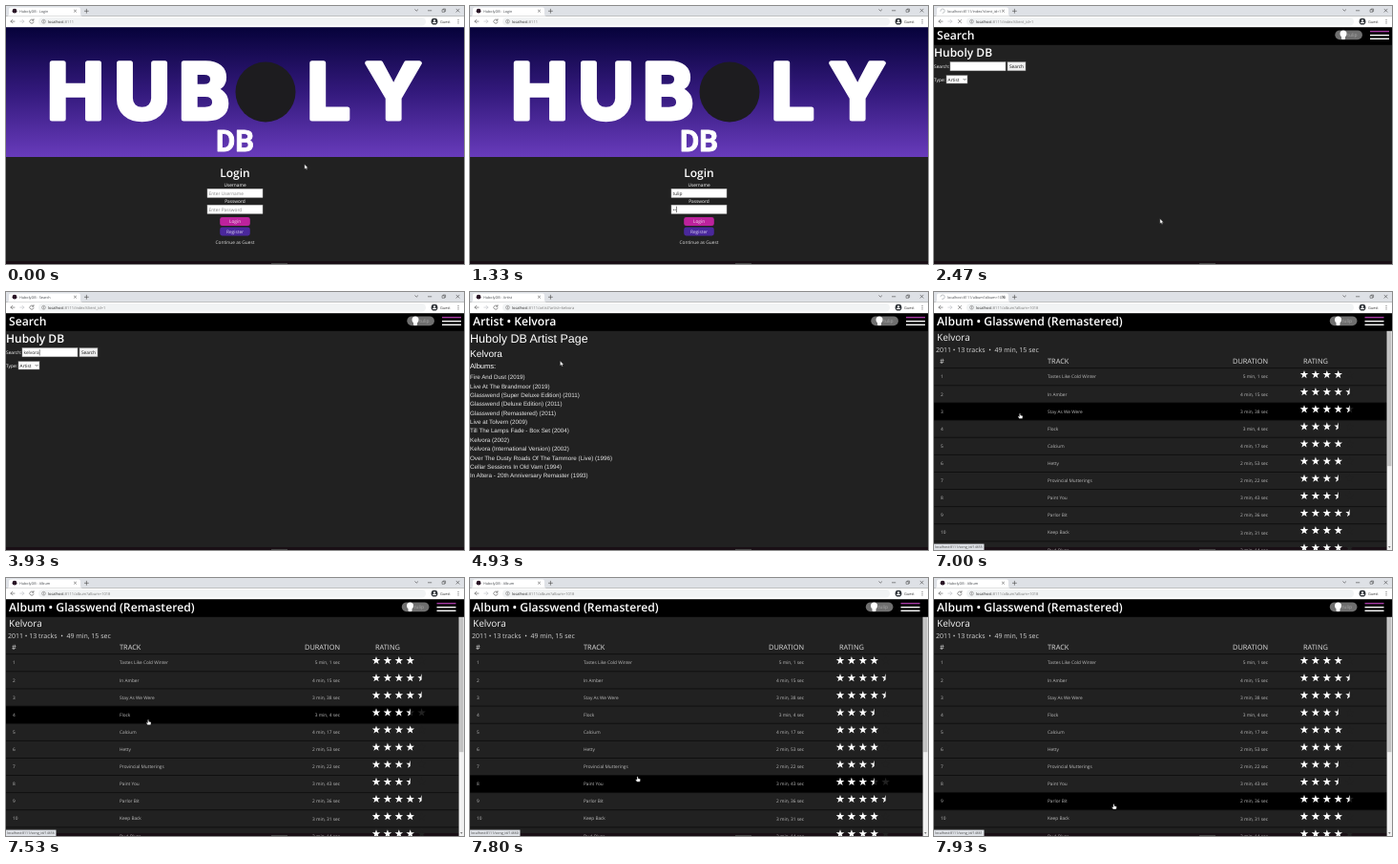
An HTML page that plays this animation: 480x270 px, repeating every 8000 ms.

```html
<!DOCTYPE html>
<html lang="en">
<head>
<meta charset="utf-8">
<title>HubolyDB</title>
<style>
html, body { margin: 0; width: 100%; height: 100%; overflow: hidden; background: #212121; }
svg { display: block; width: 100vw; height: 100vh; text-rendering: geometricPrecision; }
text { font-family: "Open Sans", "Noto Sans", sans-serif; white-space: pre; }
.arial { font-family: "Liberation Sans", Arial, sans-serif; }
.logo { font-family: Inter, Roboto, sans-serif; font-weight: 700; stroke: #fff; stroke-linejoin: round; }
.line { fill: none; stroke-linecap: round; stroke-linejoin: round; }
</style>
</head>
<body>
<svg id="stage" viewBox="0 0 480 270" xmlns="http://www.w3.org/2000/svg"></svg>
<script>
const LOOP = 8000, ROW_TOP = 79.7, ROW_H = 18.12;
const BAND = 'Kelvora', APP = 'Huboly', USER = 'tulip', HOST = 'localhost:8111';

// y is the middle of the capitals
const text = (x, y, s, size, fill = '#fff', attrs = '') =>
  `<text x="${x}" y="${(y + size * 0.36).toFixed(2)}" font-size="${size}" fill="${fill}" ${attrs}>${s}</text>`;
const rect = (x, y, w, h, fill, attrs = '') =>
  `<rect x="${x}" y="${y}" width="${w}" height="${h}" fill="${fill}" ${attrs}/>`;
const line = (d, stroke, width, attrs = '') =>
  `<path class="line" d="${d}" stroke="${stroke}" stroke-width="${width}" ${attrs}/>`;
const circle = (x, y, r, fill, attrs = '') =>
  `<circle cx="${x}" cy="${y}" r="${r}" fill="${fill}" ${attrs}/>`;
const group = (id, body) => `<g id="${id}">${body}</g>`;
const MID = 'text-anchor="middle"', END = 'text-anchor="end"', BOLD = 'font-weight="600"';

const field = (id, x, y, w, hint) =>
  rect(x, y, w, 9.2, '#fff', 'stroke="#b0b0b0" stroke-width=".5"') +
  (hint ? text(x + 1.5, y + 4.8, hint, 4.8, '#858585', `id="${id}Hint"`) : '') +
  text(x + 1.5, y + 4.8, '', 4.8, '#222', `id="${id}"`) +
  rect(0, y + 1.5, 0.5, 6.4, '#111', `id="${id}Caret"`);

const button = (y, s, fill, ink) =>
  rect(224.2, y, 31.6, 9, fill, 'rx="2.4"') + text(240, y + 4.4, s, 4.8, ink, MID);

function browser() {
  return rect(0, 0, 480, 10.6, '#dee1e6') +
    '<path d="M1 10.6Q3 10.6 3 8.5V3.6Q3 1.4 5 1.4H76Q78 1.4 78 3.6V8.5Q78 10.6 80 10.6Z" fill="#fff"/>' +
    circle(9, 5.2, 2.4, '#2a1626', 'id="icon"') +
    line('M9 3a2.2 2.2 0 1 1-2.2 2.2', '#9aa0a6', 0.6, 'id="spinner"') +
    text(14, 5.3, '', 3.75, '#45494d', 'id="tab"') +
    line('M71.4 4.1l2.2 2.2m0-2.2l-2.2 2.2', '#444', 0.55) +
    line('M82.4 5.3h4m-2-2v4', '#444', 0.6) +
    line('M428.7 3.8l1.5 1.4 1.5-1.4M442.4 4.8h3.4M472 3.2l3 3m0-3l-3 3', '#333', 0.55) +
    line('M457.4 3.8h2.4v2.5h-2.4zM458.2 3.7v-.7h2.4v2.5h-.7', '#333', 0.45) +
    rect(0, 10.6, 480, 11.6, '#fff') +
    line('M9 16.1H5m1.8-1.8L5 16.1l1.8 1.8', '#555', 0.6) +
    line('M14.8 16.1h4m-1.8-1.8l1.8 1.8-1.8 1.8', '#b8bbbf', 0.6) +
    line('M28.6 14.8a2.1 2.1 0 1 0 .4 1.9M29 13.6v1.5h-1.5', '#555', 0.6, 'id="reload"') +
    line('M25.4 14.5l3.2 3.2m0-3.2l-3.2 3.2', '#555', 0.6, 'id="stop"') +
    rect(34, 12, 406, 8.6, '#f1f3f4', 'rx="4.3"') +
    circle(39.5, 16.2, 1.9, 'none', 'stroke="#666" stroke-width=".5"') +
    line('M39.5 16.1v1M39.5 15.2v.05', '#666', 0.5) +
    `<text x="44" y="17.6" font-size="4" fill="#777"><tspan fill="#222">localhost</tspan><tspan id="path"></tspan></text>` +
    circle(449, 16.2, 3.4, '#32363b') + circle(449, 15.3, 1.1, '#fff') +
    '<path d="M446.9 18a2.1 1.5 0 0 1 4.2 0z" fill="#fff"/>' +
    text(455, 16.2, 'Guest', 3.9, '#333') +
    [14.4, 16.2, 18].map(y => circle(474, y, 0.5, '#444')).join('');
}

function login() {
  const letters = [['H', 73], ['U', 142.5], ['B', 207.5], ['L', 338], ['Y', 406]];
  return rect(0, 22, 480, 136, 'url(#sky)') +
    letters.map(([c, x]) => text(x, 89.6, c, 80, '#fff', `class="logo" stroke-width="5" ${MID}`)).join('') +
    circle(272, 90, 31.5, '#1d1c1f') +
    text(240, 141, 'DB', 31, '#fff', `class="logo" stroke-width=".8" ${MID} style="font-family:Roboto,sans-serif"`) +
    text(240, 174.3, 'Login', 12, '#fff', MID + ' ' + BOLD) +
    text(240, 187.4, 'Username', 4.8, '#fff', MID) +
    field('user', 211, 191.3, 58, 'Enter Username') +
    text(240, 204.6, 'Password', 4.8, '#fff', MID) +
    field('pass', 211, 208.2, 58, 'Enter Password') +
    button(221.1, 'Login', '#bd229d', '#f3dff0') +
    button(231.5, 'Register', '#4a289c', '#d9d0f0') +
    text(240, 247.2, 'Continue as Guest', 4.8, '#ddd', MID);
}

function search() {
  return text(0, 48.8, APP + ' DB', 12, '#fff', BOLD) +
    text(0, 63.4, 'Search:', 4.8) + field('query', 17, 58.6, 58) +
    rect(77, 58.6, 19, 9.2, '#efefef', 'stroke="#8a8a8a" stroke-width=".5"') +
    text(86.5, 63.4, 'Search', 4.8, '#111', MID) +
    text(0, 77, 'Type:', 4.8) +
    rect(13, 72.7, 22, 8.3, '#fff', 'stroke="#8a8a8a" stroke-width=".5"') +
    text(14.6, 76.9, 'Artist', 4.8, '#111') +
    line('M30.9 76.3l1.2 1.2 1.2-1.2', '#222', 0.6);
}

function artist() {
  const best = 'Glasswend';
  const albums = [
    'Fire And Dust (2019)', 'Live At The Brandmoor (2019)',
    best + ' (Super Deluxe Edition) (2011)', best + ' (Deluxe Edition) (2011)', best + ' (Remastered) (2011)',
    'Live at Tolvern (2009)', 'Till The Lamps Fade - Box Set (2004)',
    BAND + ' (2002)', BAND + ' (International Version) (2002)',
    'Over The Dusty Roads Of The Tammore (Live) (1996)',
    'Cellar Sessions In Old Varn (1994)', 'In Altera - 20th Anniversary Remaster (1993)'];
  const say = (y, s, size, fill) => text(0, y, s, size, fill, 'class="arial"');
  return say(48.1, APP + ' DB Artist Page', 12.5) + say(64.4, BAND, 10) + say(77.2, 'Albums:', 7.5) +
    albums.map((s, i) => say(88.9 + i * 9.375, s, 6.25, '#e6e6e6')).join('');
}

function starPart(x, y, from, to, fill) {
  const pts = [];
  for (let k = from; k <= to; k++) {
    const a = (k * 36 - 90) * Math.PI / 180, r = k % 2 ? 1.8 : 4.5;
    pts.push((x + r * Math.cos(a)).toFixed(2) + ',' + (y + r * Math.sin(a)).toFixed(2));
  }
  return `<polygon points="${pts.join(' ')}" fill="${fill}"/>`;
}

function stars(y, rating) {
  let out = '';
  for (let i = 0; i < 5; i++) {
    const x = 388 + i * 11.9, left = rating - i;
    out += starPart(x, y, 0, 9, '#212121');
    if (left > 0) out += starPart(x, y, left < 1 ? 5 : 0, 10, '#fff');
  }
  return out;
}

function album() {
  const tracks = [
    ['Tastes Like Cold Winter', '5 min, 1', 4], ['In Amber', '4 min, 15', 4.5],
    ['Stay As We Were', '3 min, 38', 4.5], ['Flock', '3 min, 4', 3.5],
    ['Calcium', '4 min, 17', 4], ['Hetty', '2 min, 53', 4],
    ['Provincial Mutterings', '2 min, 22', 3.5], ['Paint You', '3 min, 43', 3.5],
    ['Parlor Bit', '2 min, 36', 4.5], ['Keep Back', '3 min, 31', 4], ['By A River', '2 min, 14', 4]];
  const grey = '#bdbdbd';
  return text(3, 47.8, BAND, 10, '#f2f2f2') +
    text(2, 60.6, '2011 • 13 tracks \u00a0•\u00a0 49 min, 15 sec', 7, '#d5d5d5') +
    text(6, 72, '#', 7.3, '#ddd') + text(119, 72, 'TRACK', 7.4, '#ddd') +
    text(350, 72, 'DURATION', 7.4, '#ddd', END) + text(387, 72, 'RATING', 7.4, '#ddd') +
    rect(0, 0, 474.6, ROW_H, '#000', 'id="hover"') +
    tracks.map(([name, time, rating], i) => {
      const y = ROW_TOP + i * ROW_H;
      return rect(0, y - 0.4, 474.6, 0.8, '#0b0b0b') +
        text(7, y + 9, i + 1, 4.75, grey) + text(119, y + 9, name, 4.75, grey) +
        text(350, y + 9, time + ' sec', 4.8, grey, END) + stars(y + 6.8, rating);
    }).join('') +
    rect(474.6, 22, 5.4, 248, '#f1f1f1') + rect(475.2, 27.2, 4.2, 155, '#c1c1c1') +
    '<path d="M476 25.6l1.3-1.5 1.3 1.5zM476 266.2l1.3 1.5 1.3-1.5z" fill="#555"/>' +
    group('status', rect(0, 263.6, 52.5, 6.4, '#dee1e6') + text(1, 266.9, '', 3.6, '#444', 'id="link"'));
}

function header() {
  return rect(0, 22, 480, 18.8, '#000') +
    text(3, 30.6, '', 12.2, '#fff', BOLD + ' id="heading"') +
    group('chip',
      rect(420.3, 25.4, 28.6, 9.8, '#6f6f6f', 'rx="4.9"') +
      text(433.2, 30.2, USER, 4.9, '#a8a8a8') +
      circle(429, 29, 3.5, '#fff') + rect(427, 30.8, 4, 4.2, '#fff', 'rx="1"') +
      rect(457, 25.9, 20, 1.4, '#a63aa4') + rect(457, 29.9, 20, 1.4, '#fff') + rect(457, 33.6, 20, 1.4, '#fff'));
}

const pointers = {
  arrow: '<path d="M0 0V5.2L1.3 4.1 2.1 5.9 3 5.5 2.2 3.8H3.8Z" fill="#fff" stroke="#111" stroke-width=".35"/>',
  hand: '<path d="M-.6.4Q0-.3.6.4V2L2.6 2.6Q3.1 2.8 3 3.6L2.6 5.6H-.7L-2 3.6Q-2 2.8-1.2 3.1L-.6 3.6Z" fill="#fff" stroke="#111" stroke-width=".35"/>',
  beam: line('M-.8-2.2h1.6M0-2.2v4.6M-.8 2.4h1.6', '#222', 0.4)
};

document.getElementById('stage').innerHTML =
  '<defs><linearGradient id="sky" x1="0" y1="0" x2="0" y2="1"><stop offset="0" stop-color="#06023a"/>' +
  '<stop offset=".5" stop-color="#33197c"/><stop offset="1" stop-color="#683bbb"/></linearGradient></defs>' +
  rect(0, 0, 480, 270, '#212121') +
  rect(0, 267, 480, 3, '#190f15') + rect(278, 269, 17, 1, '#444') +
  group('login', login()) + group('search', search()) + group('artist', artist()) + group('album', album()) +
  group('header', header()) + browser() +
  group('pointer', Object.keys(pointers).map(k => group(k, pointers[k])).join(''));

const el = {};
document.querySelectorAll('[id]').forEach(e => el[e.id] = e);
const show = (id, on) => el[id].style.display = on ? '' : 'none';
const put = (id, s) => { if (el[id].textContent !== s) el[id].textContent = s; };

const heads = { login: '', search: 'Search', artist: 'Artist • ' + BAND, album: 'Album • Glasswend (Remastered)' };
const paths = { login: '', search: '/index?client_id=1', artist: '/artist?artist=' + BAND.toLowerCase(), album: '/album?album=1018' };

// time, page, loading, page title known
const visits = [
  [0, 'login', 0, 1], [2200, 'login', 1, 1], [2330, 'search', 1, 0], [2530, 'search', 0, 1],
  [4200, 'search', 1, 1], [4400, 'artist', 1, 0], [4600, 'artist', 0, 1],
  [6750, 'artist', 1, 1], [6930, 'album', 1, 0], [7130, 'album', 0, 1]];

// time, x, y, pointer from then on
const moves = [
  [0, 312.8, 165.6, 'arrow'], [70, 312.8, 165.6, 'arrow'], [480, 252, 195, 'beam'], [660, 250, 196, ''],
  [1660, 250, 198, 'arrow'], [1990, 238, 222, 'hand'], [2130, 236.8, 222.6, 'hand'], [2330, 236.8, 222.6, 'arrow'],
  [2470, 236.8, 222.6, 'arrow'], [2930, 60, 72, 'arrow'], [3000, 46, 63, 'beam'], [3590, 46, 63, ''],
  [4730, 46, 63, 'arrow'], [5000, 110, 75, 'arrow'], [5270, 203, 96, 'arrow'], [5600, 170, 140, 'arrow'],
  [5870, 138.2, 151.5, 'arrow'], [6130, 137.8, 151.3, 'arrow'], [6395, 137.8, 151.3, 'arrow'],
  [6600, 90, 127, 'hand'], [7200, 90, 127, 'hand'], [7330, 112, 136, 'hand'],
  [7530, 148.6, 147.2, 'hand'], [7930, 188.4, 236.4, 'hand'], [8000, 188.4, 236.4, 'hand']];

const last = (table, t) => table.filter(r => r[0] <= t).pop();

function pointerAt(t) {
  const a = last(moves, t), b = moves[moves.indexOf(a) + 1] || a;
  const k = b === a ? 0 : (t - a[0]) / (b[0] - a[0]);
  return { x: a[1] + (b[1] - a[1]) * k, y: a[2] + (b[2] - a[2]) * k, kind: a[3] };
}

function type(id, word, keys, t, from, to) {
  const s = word.slice(0, keys.filter(k => k <= t).length), caret = t >= from && t < to;
  put(id, s);
  if (el[id + 'Hint']) show(id + 'Hint', !s);
  show(id + 'Caret', caret);
  if (caret) el[id + 'Caret'].setAttribute('x', +el[id].getAttribute('x') + (s ? el[id].getComputedTextLength() : 0) + 0.2);
}

function draw(now) {
  const t = Math.floor((now % LOOP + 4) * 0.015) / 0.015 + 1;
  const [, page, loading, titled] = last(visits, t);
  for (const p in heads) show(p, p === page);
  show('header', page !== 'login');
  put('heading', heads[page]);
  el.chip.setAttribute('transform', `translate(${page === 'album' ? -5.5 : 0} 0)`);

  const name = page[0].toUpperCase() + page.slice(1);
  put('tab', titled ? `${APP}DB - ${name}` : (HOST + paths[page]).slice(0, 32));
  put('path', ':8111' + paths[page]);
  show('icon', !loading);
  show('spinner', loading);
  show('stop', loading);
  show('reload', !loading);
  el.spinner.setAttribute('transform', `rotate(${t * 0.4 % 360} 9 5.2)`);

  if (page === 'login') {
    type('user', USER, [660, 730, 800, 860, 930], t, 530, 1130);
    type('pass', '••••', [1265, 1330, 1400, 1465], t, 1130, 2200);
  }
  if (page === 'search') type('query', BAND.toLowerCase(), [3600, 3665, 3730, 3800, 3865, 3930, 3930], t, 3330, 4400);

  const p = pointerAt(t);
  for (const k in pointers) show(k, k === p.kind);
  el.pointer.setAttribute('transform', `translate(${p.x.toFixed(2)} ${p.y.toFixed(2)})`);
  if (page === 'album') {
    const row = Math.floor((p.y - ROW_TOP) / ROW_H);
    el.hover.setAttribute('y', ROW_TOP + row * ROW_H);
    put('link', `${HOST}/song_id/${14653 + row}`);
  }
}

function tick() {
  draw(performance.now());
  requestAnimationFrame(tick);
}
tick();
</script>
</body>
</html>
```
